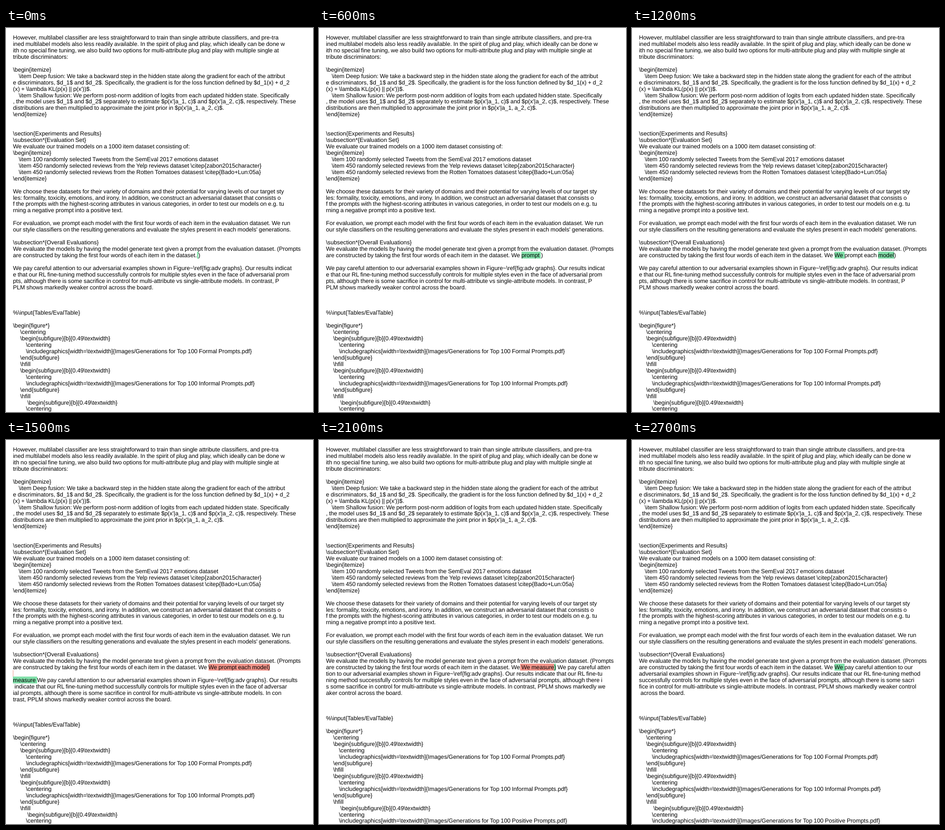
These frames come from a looping animation (670 px wide and 836 px high, 3000 ms). An HTML page:

```html
<!DOCTYPE html>
<html lang="en">
<head>
<meta charset="utf-8">
<title>Editing a paper</title>
<style>
html, body { margin: 0; width: 100%; height: 100%; overflow: hidden; background: #fff; }
#page {
  position: fixed; inset: 0; margin: 0; padding: 14.1px 0 0 15.3px;
  box-sizing: border-box; overflow: hidden;
  font: 12.72px/13.94px "Liberation Sans", Arial, sans-serif;
  word-spacing: -0.4px; white-space: pre; color: #000;
  text-rendering: geometricPrecision;
}
.add { background: #82e0aa; }
.del { background: #f1948a; }
.del:empty { padding-right: 1px; }
</style>
</head>
<body>
<pre id="page"></pre>
<script>
const COLS = 111, STEP = 300;

const head = String.raw`However, multilabel classifier are less straightforward to train than single attribute classifiers, and pre-trained multilabel models also less readily available. In the spirit of plug and play, which ideally can be done with no special fine tuning, we also build two options for multi-attribute plug and play with multiple single attribute discriminators:

\begin{itemize}
    \item Deep fusion: We take a backward step in the hidden state along the gradient for each of the attribute discriminators, $d_1$ and $d_2$. Specifically, the gradient is for the loss function defined by $d_1(x) + d_2(x) + \lambda KL(p(x) || p(x'))$.
    \item Shallow fusion: We perform post-norm addition of logits from each updated hidden state. Specifically, the model uses $d_1$ and $d_2$ separately to estimate $p(x'|a_1, c)$ and $p(x'|a_2, c)$, respectively. These distributions are then multiplied to approximate the joint prior in $p(x'|a_1, a_2, c)$.
\end{itemize}


\section{Experiments and Results}
\subsection*{Evaluation Set}
We evaluate our trained models on a 1000 item dataset consisting of:
\begin{itemize}
    \item 100 randomly selected Tweets from the SemEval 2017 emotions dataset
    \item 450 randomly selected reviews from the Yelp reviews dataset \citep{zabon2015character}
    \item 450 randomly selected reviews from the Rotten Tomatoes datasest \citep{Bado+Lun:05a}
\end{itemize}

We choose these datasets for their variety of domains and their potential for varying levels of our target styles: formality, toxicity, emotions, and irony. In addition, we construct an adversarial dataset that consists of the prompts with the highest-scoring attributes in various categories, in order to test our models on e.g. turning a negative prompt into a positive text.

For evaluation, we prompt each model with the first four words of each item in the evaluation dataset. We run our style classifiers on the resulting generations and evaluate the styles present in each models' generations.

\subsection*{Overall Evaluations}
We evaluate the models by having the model generate text given a prompt from the evaluation dataset. (Prompts are constructed by taking the first four words of each item in the dataset.`;

const tail = String.raw`pay careful attention to our adversarial examples shown in Figure~\ref{fig:adv graphs}. Our results indicate that our RL fine-tuning method successfully controls for multiple styles even in the face of adversarial prompts, although there is some sacrifice in control for multi-attribute vs single-attribute models. In contrast, PPLM shows markedly weaker control across the board.



%\input{Tables/EvalTable}

\begin{figure*}
     \centering
     \begin{subfigure}[b]{0.49\textwidth}
         \centering
         \includegraphics[width=\textwidth]{Images/Generations for Top 100 Formal Prompts.pdf}
     \end{subfigure}
     \hfill
     \begin{subfigure}[b]{0.49\textwidth}
         \centering
         \includegraphics[width=\textwidth]{Images/Generations for Top 100 Informal Prompts.pdf}
     \end{subfigure}
     \hfill
          \begin{subfigure}[b]{0.49\textwidth}
         \centering
         \includegraphics[width=\textwidth]{Images/Generations for Top 100 Positive Prompts.pdf}`;

// Text between head and tail: «inserted», ‹deleted›
const edits = [
  "« »)\n\nWe ",
  "« We »)\n\nWe ",
  " We «prompt »)\n\nWe ",
  " We prompt «each »)\n\nWe ",
  " We «We »prompt each «model»)\n\nWe ",
  " We ‹We prompt each model)›\n‹›\n«measure »We ",
  " We «We »measure We ",
  " We‹ We measure›«)» We ",
  " We‹) We› ",
  " We «We »"
];

const tags = {
  "«": '<span class="add">', "»": "</span>",
  "‹": '<span class="del">', "›": "</span>"
};

// Breaks at a fixed column; a line break counts as a character.
function layout(text) {
  let out = "", col = 0;
  for (const ch of text) {
    if (tags[ch]) { out += tags[ch]; continue; }
    if (ch === "\n") {
      col = 0;
    } else if (col === COLS) {
      out += "\n";
      col = 0;
    }
    out += ch;
    col++;
  }
  return out;
}

const page = document.getElementById("page");
const views = edits.map(edit => layout(head + edit + tail));
const start = performance.now();
let shown = -1;

function draw(now) {
  const step = Math.floor(Math.max(0, now - start) / STEP) % views.length;
  if (step !== shown) page.innerHTML = views[shown = step];
  requestAnimationFrame(draw);
}
draw(start);
</script>
</body>
</html>
```
